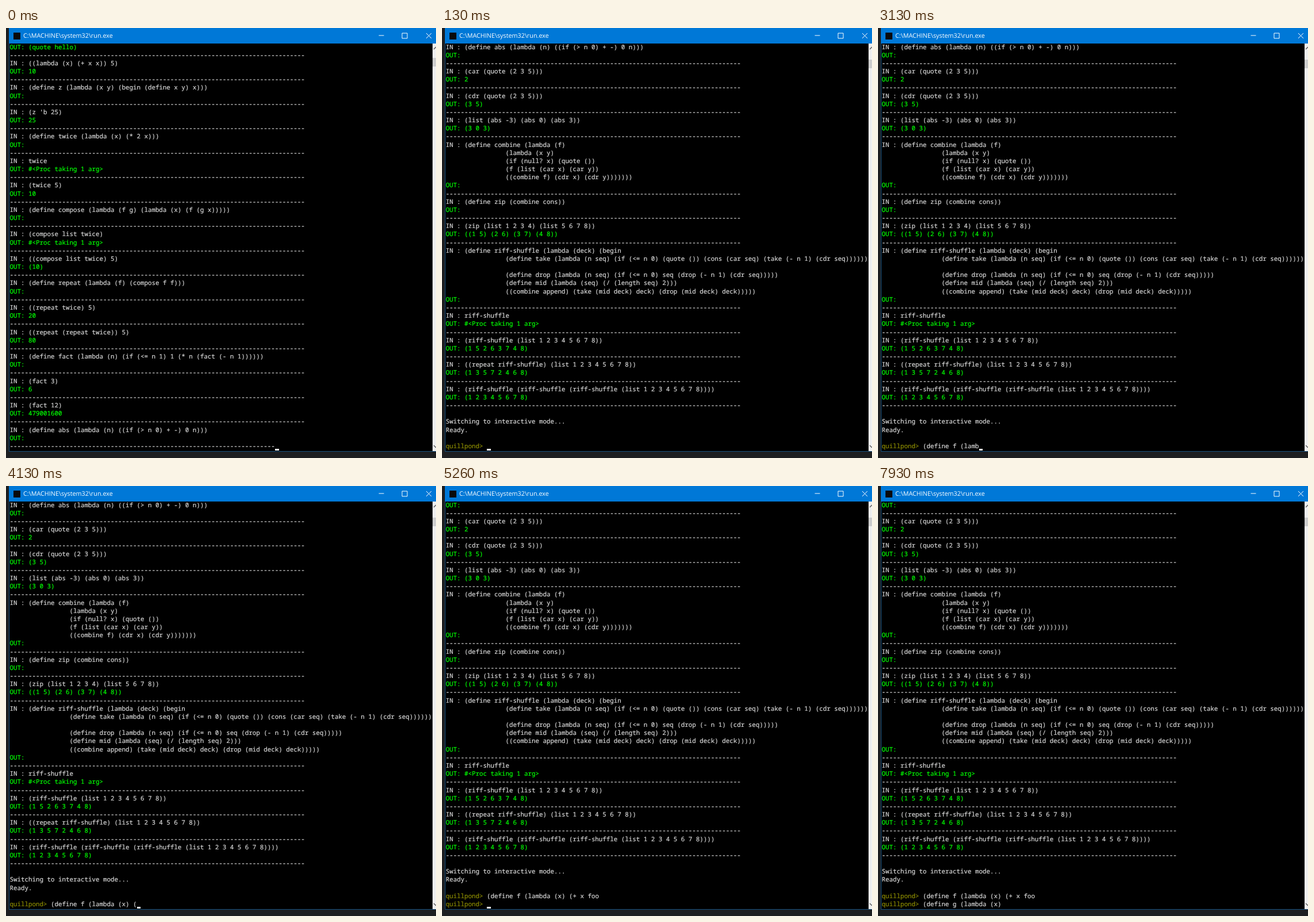
Write an HTML page that moves like this. It is 748x748 px and loops after 8 s.

```html
<!DOCTYPE html>
<html lang="en">
<head>
<meta charset="utf-8">
<title>Console session</title>
<style>
  html, body { margin: 0; width: 100%; height: 100%; overflow: hidden; background: #1d1e20; }
  #stage { position: relative; width: 748px; height: 748px; overflow: hidden; }
  #stage > * { position: absolute; }
  #bar { left: 5px; top: 0; width: 743px; height: 27px; background: #0078d7; }
  #title {
    left: 30px; top: 0; color: #fff; white-space: pre;
    font: 10.8px/27px "Open Sans", "Noto Sans", sans-serif;
    text-rendering: geometricPrecision;
  }
  #icon { left: 13px; top: 8px; width: 12px; height: 12px; background: #0a0a0a; }
  #frame { left: 5px; top: 27px; width: 743px; height: 710px; background: #17507f; }
  #client { left: 6px; top: 27px; width: 736px; height: 709px; background: #000; }
  #screen {
    left: 6.5px; top: 26.5px; margin: 0; color: #d6d6d6; white-space: pre;
    font: 10.833px/14.17px "Noto Sans Mono", "DejaVu Sans Mono", monospace;
    font-variant-ligatures: none; text-rendering: geometricPrecision;
    -webkit-text-stroke: 0.22px;
  }
  #screen .out { color: #0f0; }
  #screen .prompt { color: #8a8a00; }
  #cursor { top: 731.7px; width: 6.5px; height: 3.6px; background: #f4f4f4; }
  #scroll { left: 742px; top: 27px; width: 6px; height: 709px; background: #f0f0f0; }
  #thumb { left: 742px; width: 6px; height: 15px; background: #cdcdcd; }
  svg { left: 0; top: 0; fill: none; stroke: #fff; }
</style>
</head>
<body>
<div id="stage">
  <div id="frame"></div>
  <div id="bar"></div>
  <div id="icon"></div>
  <div id="title">C:\MACHINE\system32\run.exe</div>
  <div id="client"></div>
  <pre id="screen"></pre>
  <div id="cursor"></div>
  <div id="scroll"></div>
  <div id="thumb"></div>
  <svg width="748" height="748">
    <path d="M648.5 13h9M689 9h9v9h-9zM731 9l9 9M740 9l-9 9"/>
    <path d="M744 37l4 -4M744 726l4 4" stroke="#555" stroke-width="1.3"/>
  </svg>
</div>
<script>
const LOOP = 8000, ROWS = 50, CELL = 6.5, LEFT = 6.5;
const RULE = '-'.repeat(79);
const PROMPT = 'quillpond> ';

const session = `OUT: (quote hello)
IN : ((lambda (x) (+ x x)) 5)
OUT: 10
IN : (define z (lambda (x y) (begin (define x y) x)))
OUT:
IN : (z 'b 25)
OUT: 25
IN : (define twice (lambda (x) (* 2 x)))
OUT:
IN : twice
OUT: #<Proc taking 1 arg>
IN : (twice 5)
OUT: 10
IN : (define compose (lambda (f g) (lambda (x) (f (g x)))))
OUT:
IN : (compose list twice)
OUT: #<Proc taking 1 arg>
IN : ((compose list twice) 5)
OUT: (10)
IN : (define repeat (lambda (f) (compose f f)))
OUT:
IN : ((repeat twice) 5)
OUT: 20
IN : ((repeat (repeat twice)) 5)
OUT: 80
IN : (define fact (lambda (n) (if (<= n 1) 1 (* n (fact (- n 1))))))
OUT:
IN : (fact 3)
OUT: 6
IN : (fact 12)
OUT: 479001600
IN : (define abs (lambda (n) ((if (> n 0) + -) 0 n)))
OUT:
IN : (car (quote (2 3 5)))
OUT: 2
IN : (cdr (quote (2 3 5)))
OUT: (3 5)
IN : (list (abs -3) (abs 0) (abs 3))
OUT: (3 0 3)
IN : (define combine (lambda (f)
                (lambda (x y)
                (if (null? x) (quote ())
                (f (list (car x) (car y))
                ((combine f) (cdr x) (cdr y)))))))
OUT:
IN : (define zip (combine cons))
OUT:
IN : (zip (list 1 2 3 4) (list 5 6 7 8))
OUT: ((1 5) (2 6) (3 7) (4 8))
IN : (define riff-shuffle (lambda (deck) (begin
                (define take (lambda (n seq) (if (<= n 0) (quote ()) (cons (car seq) (take (- n 1) (cdr seq))))))

                (define drop (lambda (n seq) (if (<= n 0) seq (drop (- n 1) (cdr seq)))))
                (define mid (lambda (seq) (/ (length seq) 2)))
                ((combine append) (take (mid deck) deck) (drop (mid deck) deck)))))
OUT:
IN : riff-shuffle
OUT: #<Proc taking 1 arg>
IN : (riff-shuffle (list 1 2 3 4 5 6 7 8))
OUT: (1 5 2 6 3 7 4 8)
IN : ((repeat riff-shuffle) (list 1 2 3 4 5 6 7 8))
OUT: (1 3 5 7 2 4 6 8)
IN : (riff-shuffle (riff-shuffle (riff-shuffle (list 1 2 3 4 5 6 7 8))))
OUT: (1 2 3 4 5 6 7 8)

Switching to interactive mode...
Ready.
`;
const printed = session.split('\n').flatMap(s => s.startsWith('OUT:') ? [s, RULE] : [s]);

// Typing bursts: text, time of its first key, time of its last key
const burst = (text, from, to) => ({ text, from, to });
const firstEntry = [
  burst('(de', 1930, 2130), burst('fine f (lamb', 2330, 3130), burst('da ', 3260, 3330),
  burst('(x)', 3660, 3860), burst(' (+', 4000, 4200), burst(' x foo', 4400, 5060)
];
const secondEntry = [
  burst('(def', 5530, 5800), burst('ine ', 6060, 6200), burst('g (', 6400, 6660),
  burst('lamb', 6800, 7060), burst('da (x)', 7200, 7530), burst(' ', 7800, 7860)
];
const PRINTED = 130, ENTER = 5260;

function typed(entry, t) {
  return entry.filter(b => t >= b.from).map(({ text, from, to }) => {
    const progress = Math.min(1, (t - from) / (to - from));
    return text.slice(0, 1 + Math.floor((text.length - 1) * progress + 1e-6));
  }).join('');
}

// A steady blink while idle; once typing starts, only a few pauses let it go dark
function cursorDark(t) {
  if (t < 2000) return Math.floor((t + 190) / 350) % 2 === 0 && t > 350;
  return [[4860, ENTER], [5800, 6060], [7930, LOOP]].some(([a, b]) => t >= a && t < b);
}

const submitted = PROMPT + typed(firstEntry, LOOP);

function lastLine(t) {
  if (t < 60) return RULE.slice(0, 71);
  if (t < PRINTED) return RULE;
  return PROMPT + typed(t < ENTER ? firstEntry : secondEntry, t);
}

function topRow(t) {
  if (t < 60) return 0;
  if (t < PRINTED) return 22;
  return t < ENTER ? 47 : 48;
}

const el = id => document.getElementById(id);
const screenEl = el('screen'), cursor = el('cursor'), thumb = el('thumb');

function span(text, cls) {
  const node = document.createElement('span');
  node.textContent = text;
  node.className = cls;
  return node;
}

function lineNodes(text) {
  if (text.startsWith('OUT:')) return [span(text, 'out'), '\n'];
  if (text.startsWith(PROMPT)) return [span(PROMPT, 'prompt'), text.slice(PROMPT.length), '\n'];
  return [text, '\n'];
}

let shown = '';
function draw(t) {
  const top = topRow(t), last = lastLine(t);
  cursor.style.left = LEFT + last.length * CELL + 'px';
  cursor.style.visibility = cursorDark(t) ? 'hidden' : 'visible';
  thumb.style.top = 52 + top / 16 + 'px';
  if (shown === top + last) return;
  shown = top + last;
  const rows = [...printed, submitted].slice(top, top + ROWS - 1);
  screenEl.replaceChildren(...[...rows, last].flatMap(lineNodes));
}

const start = performance.now();
function tick() {
  draw((performance.now() - start) % LOOP);
  requestAnimationFrame(tick);
}
draw(0);
requestAnimationFrame(tick);
</script>
</body>
</html>
```
